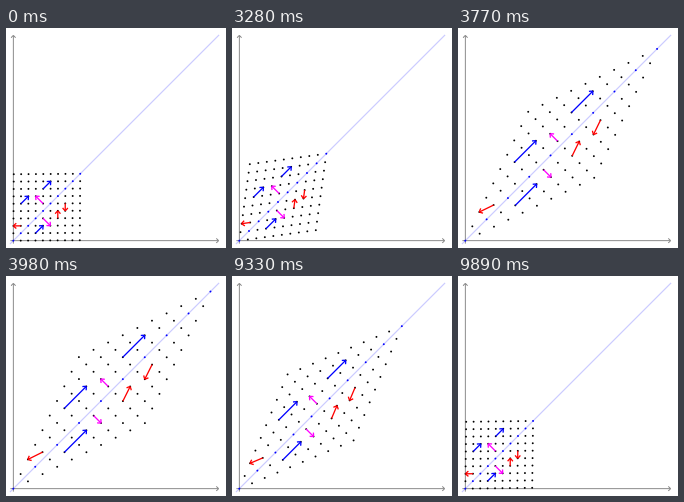
A matplotlib script for the animation above (9.96 s loop, 220 by 220 pixels).

```python
import numpy as np
import matplotlib.pyplot as plt
from matplotlib.animation import FuncAnimation
from matplotlib.collections import LineCollection

SIZE, DPI, TICK = 220, 100, 20
LOOP, GROW, SHRINK, STEP, STEPS = 9960, 3000, 8980, 70, 15
PX = 72 / DPI
UNIT = SIZE / 30
BLUE, RED, MAGENTA = "#0000ff", "#ff0000", "#ff00ff"

# colour, tail and head of each vector on the grid
ARROWS = [
    (BLUE, (1, 5), (2, 6)), (BLUE, (4, 7), (5, 8)), (BLUE, (3, 1), (4, 2)),
    (MAGENTA, (4, 5), (3, 6)), (MAGENTA, (4, 3), (5, 2)),
    (RED, (6, 3), (6, 4)), (RED, (7, 5), (7, 4)), (RED, (1, 2), (0, 2)),
]
TAILS = np.array([a[1] for a in ARROWS], float)
HEADS = np.array([a[2] for a in ARROWS], float)
GRID = np.array([(x, y) for x in range(10) for y in range(10)], float)


def arrow(tail, head, size):
    """Shaft and curved barbs, with size in pixels."""
    along = (head - tail) / np.hypot(*(head - tail))
    side = np.array([-along[1], along[0]])
    u = np.linspace(-1, 1, 9)[:, None]
    tip = head - 0.3 * size / 2.6 * along / UNIT
    barbs = tip + size / UNIT * (side * u - along * np.abs(u) ** 1.4)
    return [np.array([tail, tip]), barbs]


def matrix(step):
    """Blend from the identity to [[2, 1], [1, 2]] along a sigmoid."""
    s = 1 / (1 + np.exp(-10 * (step / STEPS - 0.5)))
    return np.eye(2) + s * np.ones((2, 2))


def step_at(t):
    if t < GROW:
        return 0
    if t < SHRINK:
        return min((t - GROW) // STEP + 1, STEPS)
    return STEPS - 1 - (t - SHRINK) // STEP


fig = plt.figure(figsize=(SIZE / DPI, SIZE / DPI), dpi=DPI, facecolor="white")
ax = fig.add_axes([0, 0, 1, 1])
ax.set(xlim=(-1, 29), ylim=(-1, 29))
ax.axis("off")

ax.plot([-0.4, 28], [-0.4, 28], color="#ccccff", lw=1.2 * PX, snap=False, zorder=1)
axis_lines = []
for end in ((28, 0), (0, 28)):
    end = np.array(end, float)
    axis_lines += arrow(-0.4 * end / 28, end, 2.2)
ax.add_collection(LineCollection(axis_lines, colors="#808080",
                                 linewidths=0.9 * PX, snap=False, zorder=2))

dot_colors = [BLUE if x == y else "black" for x, y in GRID]
dots = ax.scatter(GRID[:, 0], GRID[:, 1], s=(1.9 * PX) ** 2, c=dot_colors,
                  linewidths=0, snap=False, zorder=3)
vectors = LineCollection([], colors=[a[0] for a in ARROWS for _ in range(2)],
                         linewidths=1.3 * PX, snap=False, zorder=4)
ax.add_collection(vectors)


def draw(i):
    # sample the middle of each tick
    m = matrix(step_at(i * TICK + TICK // 2))
    dots.set_offsets(GRID @ m)
    lines = []
    for tail, head in zip(TAILS @ m, HEADS @ m):
        lines += arrow(tail, head, 2.6)
    vectors.set_segments(lines)
    return dots, vectors


anim = FuncAnimation(fig, draw, frames=LOOP // TICK, interval=TICK,
                     init_func=lambda: draw(0), repeat=True, repeat_delay=0)
plt.show()
```
